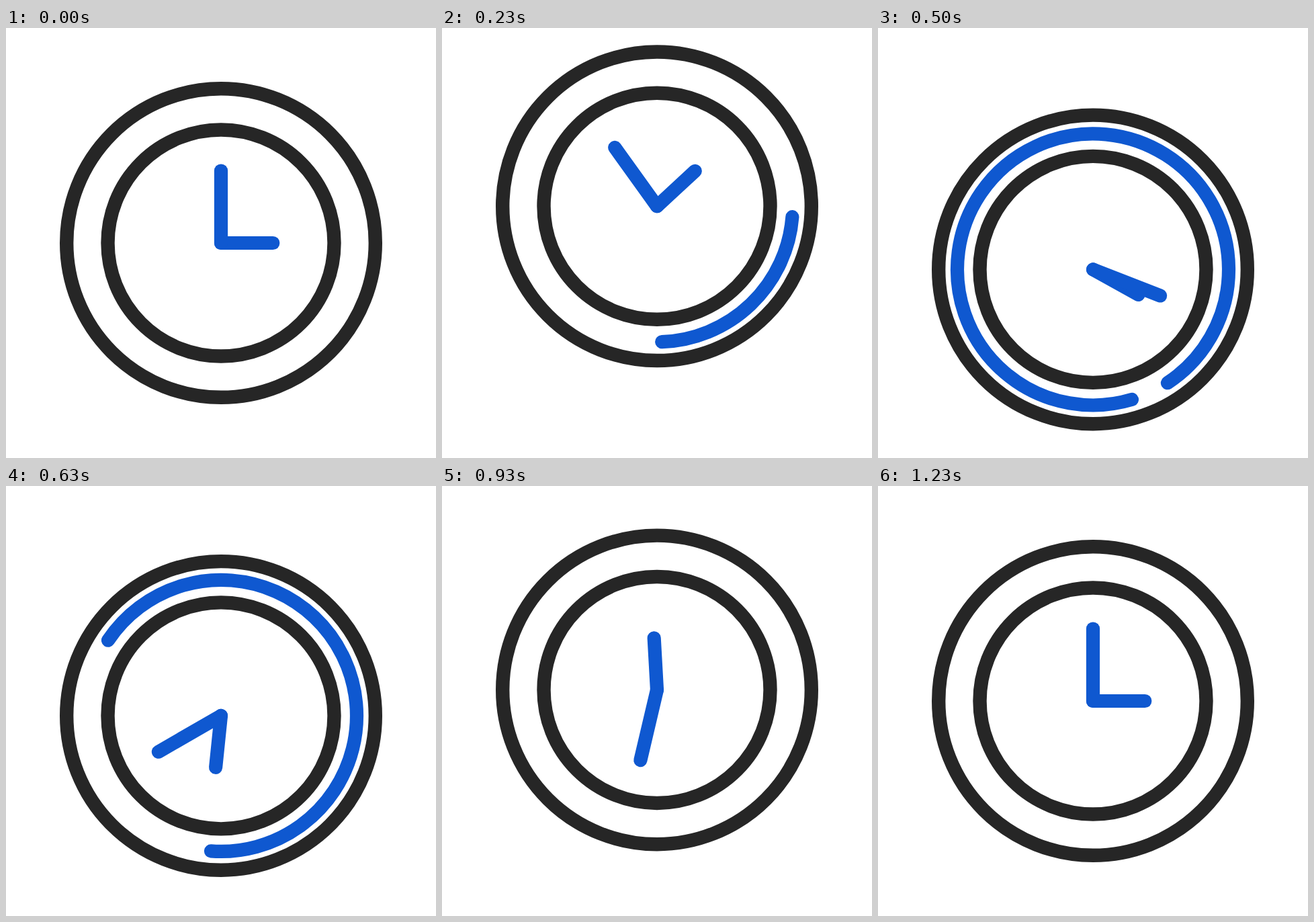
Recreate the animation shown at these times as an HTML page. Size 640 by 640 pixels, loop 1670 ms.

```html
<!DOCTYPE html>
<html lang="en">
<head>
<meta charset="utf-8">
<title>Clock</title>
<style>
html, body { margin: 0; width: 100%; height: 100%; overflow: hidden; background: #fff; }
svg { display: block; width: 100%; height: 100%; }
g { fill: none; stroke: #262626; stroke-width: 20.4; stroke-linecap: round; }
.blue { stroke: #0f58d0; stroke-width: 20.2; }
</style>
</head>
<body>
<svg viewBox="0 0 640 640">
  <g id="clock">
    <circle r="229.8"/>
    <circle r="168.5"/>
    <path id="arc" class="blue"/>
    <path id="hour" class="blue" d="M0 0V-77.3"/>
    <path id="minute" class="blue" d="M0 0V-107.5"/>
  </g>
</svg>
<script>
const LOOP = 1670, FPS = 30, ARC_R = 202;
const el = id => document.getElementById(id);
const [clock, arc, hour, minute] = ['clock', 'arc', 'hour', 'minute'].map(el);

// Bezier easing with flat ends: control points (x1, 0) and (x2, 1).
const ease = (x1, x2) => t => {
  let lo = 0, hi = 1;
  for (let i = 0; i < 30; i++) {
    const s = (lo + hi) / 2, r = 1 - s;
    if (3 * x1 * s * r * r + 3 * x2 * s * s * r + s ** 3 < t) lo = s; else hi = s;
  }
  return lo * lo * (3 - 2 * lo);
};
const soft = ease(1 / 3, 2 / 3);
const inOut = ease(0.42, 0.58);

// Each key is [frame, value, easing towards this key].
const track = keys => f => {
  if (f <= keys[0][0]) return keys[0][1];
  for (let i = 1; i < keys.length; i++) {
    const [a, from] = keys[i - 1], [b, to, fn] = keys[i];
    if (f < b) return from + (to - from) * fn((f - a) / (b - a));
  }
  return keys[keys.length - 1][1];
};

const bounce = track([[0, 320], [8, 263.5, inOut], [16, 362.5, inOut], [24, 292.2, inOut], [33, 320, inOut]]);
const hourTurn = track([[0, 90], [6, 46.2, soft], [37, 450, ease(0.366, 0.7)]]);
const minuteTurn = track([[0, 0], [6, -38, soft], [37, 720, ease(0.335, 0.695)]]);
const arcTurn = track([[5, 91.2], [25, 209.9, soft]]);
const arcHead = track([[2.5, 0], [16, 360, inOut]]);
const arcTail = track([[13, 0], [28, 360, inOut]]);

const point = deg => {
  const a = deg * Math.PI / 180;
  return (ARC_R * Math.sin(a)).toFixed(2) + ' ' + (-ARC_R * Math.cos(a)).toFixed(2);
};

function arcPath(from, to) {
  if (to - from < 0.1) return '';
  const big = to - from > 180 ? 1 : 0;
  return `M${point(from)}A${ARC_R} ${ARC_R} 0 ${big} 1 ${point(to)}`;
}

function draw(ms) {
  const f = Math.floor((ms % LOOP + 3.4) * FPS / 1000);
  const turn = arcTurn(f);
  clock.setAttribute('transform', `translate(320 ${bounce(f)})`);
  hour.setAttribute('transform', `rotate(${hourTurn(f)})`);
  minute.setAttribute('transform', `rotate(${minuteTurn(f)})`);
  arc.setAttribute('d', arcPath(turn + arcTail(f), turn + arcHead(f)));
}

const start = performance.now();
function tick() {
  draw(performance.now() - start);
  requestAnimationFrame(tick);
}
tick();
</script>
</body>
</html>
```
